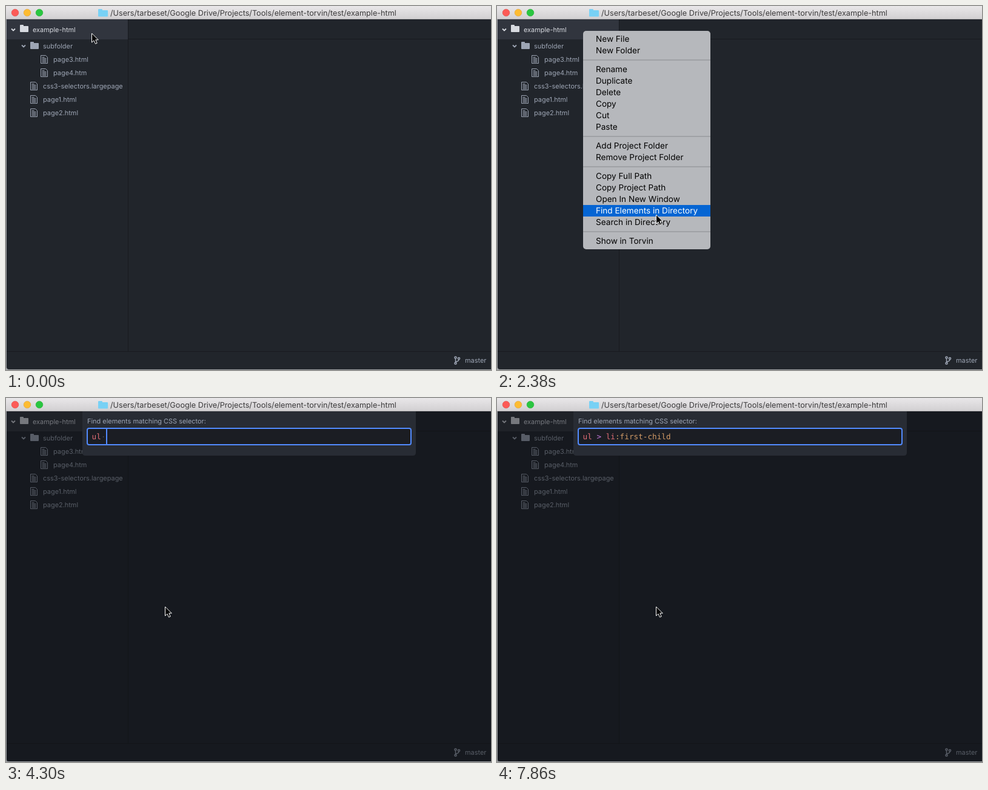
Animation of 800 by 600 pixels, one loop 8000 ms. Source, as an HTML page:

```html
<!DOCTYPE html>
<html lang="en">
<head>
<meta charset="utf-8">
<title>Find elements in directory</title>
<style>
  html, body { margin: 0; width: 100%; height: 100%; overflow: hidden; background: #a4a6a9; }
  svg { display: block; width: 800px; height: 600px; }
  text { font-family: Inter, sans-serif; text-rendering: geometricPrecision; white-space: pre; }
  .title { font-size: 12.68px; fill: #3c3b3c; }
  .ui { font-size: 10.93px; fill: #9da5b4; }
  .menu { font-size: 13.58px; fill: #000; }
  .menu.on { fill: #fff; }
  .code { font: 12.7px "DejaVu Sans Mono", monospace; }
  .bright { fill: #d7dae0; }
  .soft { fill: #9da5b4; }
  .line { fill: none; stroke: #9da5b4; }
</style>
</head>
<body>
<svg viewBox="0 0 800 600">
  <defs>
    <linearGradient id="bar" x2="0" y2="1">
      <stop stop-color="#e9e7e9"/><stop offset="1" stop-color="#d1cfd1"/>
    </linearGradient>
    <path id="folder" d="M0 1q0-1 1-1h4q1 0 1 1v1h7q1 0 1 1v8q0 1-1 1h-12q-1 0-1-1z"/>
    <path id="file" d="M.5.5h8l3 3v10h-11zM2.5 3.5h4M2.5 5.5h7M2.5 7.5h7M2.5 9.5h7M2.5 11.5h7"/>
  </defs>

  <path d="M1 20H800V599H5q-4 0-4-4z" fill="#21252b"/>
  <rect x="1" y="22" width="200" height="33" fill="#31353e"/>
  <path d="M201.5 22V569M202 54.5H800M1 569.5H800" stroke="#181a1f"/>
  <g id="tree"></g>
  <g class="line" stroke-width="1.5">
    <circle cx="741.5" cy="579.5" r="1.6"/>
    <circle cx="747" cy="581" r="1.6"/>
    <circle cx="741.5" cy="589" r="1.6"/>
    <path d="M741.5 581V587.5M747 582.5q0 3-5 4"/>
  </g>
  <text class="ui" x="757" y="588">master</text>

  <rect id="dim" x="1" y="22" width="799" height="577" fill="#0c0e11"/>
  <g id="dialog">
    <path d="M126 22H676V90q0 5-5 5H131q-5 0-5-5z" fill="#282c34"/>
    <text class="ui" x="134" y="42">Find elements matching CSS selector:</text>
    <rect x="134" y="50" width="534" height="27" rx="3" fill="#1b1d23" stroke="#528bff" stroke-width="2"/>
    <text id="query" class="code" x="141.5" y="68"></text>
    <circle id="space" cy="64" r=".9" fill="#484e59"/>
    <rect id="caret" y="51" width="2" height="25" fill="#528bff"/>
  </g>

  <rect width="800" height="22" fill="url(#bar)"/>
  <path d="M0 21.5H800" stroke="#b3b1b3"/>
  <g stroke-width=".6">
    <circle cx="15" cy="11" r="5.8" fill="#fc5b57" stroke="#df443f"/>
    <circle cx="35" cy="11" r="5.8" fill="#fdbc32" stroke="#dea034"/>
    <circle cx="55" cy="11" r="5.8" fill="#2ac641" stroke="#1dad2b"/>
  </g>
  <use href="#folder" transform="translate(152 5) scale(1.15 1.05)" fill="#78d1f5"/>
  <text class="title" x="172" y="16">/Users/tarbeset/Google Drive/Projects/Tools/element-torvin/test/example-html</text>

  <g id="menu"></g>
  <path id="mouse" d="M0 0V15L3.5 11.8L6 17.3L8.7 16.2L6.3 10.8H10.8Z" fill="#000" stroke="#fff"/>
</svg>
<script>
const $ = id => document.getElementById(id);

// Project tree: label, text x, row centre
const entries = [
  ['example-html', 44, 39], ['subfolder', 61, 66], ['page3.html', 78, 88], ['page4.htm', 78, 110],
  ['css3-selectors.largepage', 61, 132], ['page1.html', 61, 154], ['page2.html', 61, 176]
];
$('tree').innerHTML = entries.map(([label, x, y], i) => {
  const shade = i ? 'soft' : 'bright';
  const icon = i < 2
    ? `<path class="line" d="M${x - 35} ${y - 1.5}l3 3l3-3" stroke-width="1.8" style="stroke:${i ? '#9da5b4' : '#d7dae0'}"/>
       <use href="#folder" class="${shade}" x="${x - 21}" y="${i ? y - 7 : y - 8}"/>`
    : `<use href="#file" class="line" x="${x - 21}" y="${y - 7}"/>`;
  return `${icon}<text class="ui ${shade}" x="${x}" y="${y + 4}">${label}</text>`;
}).join('');

// Context menu, with empty strings as separators
const labels = ['New File', 'New Folder', '', 'Rename', 'Duplicate', 'Delete', 'Copy', 'Cut', 'Paste', '',
  'Add Project Folder', 'Remove Project Folder', '', 'Copy Full Path', 'Copy Project Path',
  'Open In New Window', 'Find Elements in Directory', 'Search in Directory', '', 'Show in Torvin'];
const items = [];
let rowTop = 45;
let menuBody = '<rect x="142" y="41" width="210" height="360" rx="5" fill="#b6b8bc"/>' +
  '<rect id="pick" x="142" width="210" height="19" fill="#0565d3"/>';
for (const label of labels) {
  if (label) {
    menuBody += `<text class="menu" x="163" y="${rowTop + 14}">${label}</text>`;
    items.push(rowTop);
    rowTop += 19;
  } else {
    menuBody += `<rect x="142" y="${rowTop + 5}" width="210" height="2" fill="#9fa1a5"/>`;
    rowTop += 12;
  }
}
$('menu').innerHTML = menuBody;
const menuTexts = [...document.querySelectorAll('.menu')];

// Typing: time, typed length, caret visible
const selector = 'ul > li:first-child';
const typing = [
  [0, 0, 1], [3560, 0, 0], [3850, 1, 1], [4000, 2, 1], [4300, 3, 1], [4600, 4, 1], [4750, 5, 1],
  [5040, 7, 1], [5490, 7, 0], [5640, 8, 1], [5780, 9, 1], [5930, 10, 1], [6080, 11, 1], [6220, 12, 1],
  [6370, 13, 1], [6670, 14, 1], [7120, 14, 0], [7270, 16, 1], [7410, 18, 1], [7560, 19, 1], [7860, 19, 0]
];
const colours = ['#e06c75', '#c678dd', '#e06c75', '#d19a66', '#abb2bf'];
const syntax = /^(u?l?)( ?>? ?)(l?i?)(:first-child|:first)?(.*)$/;
const advance = 7.646;

function drawMouse(t) {
  const step = t < 1340 ? 0 : Math.min(6, 1 + Math.floor((t - 1338) / 148));
  const p = step / 6, eased = p * p * (3 - 2 * p);
  const x = 141 + 121 * eased + .5;
  const y = t < 2380 ? 45 + 301 * eased : 344;
  $('mouse').setAttribute('transform', `translate(${x} ${y})`);
  return y;
}

function drawMenu(t, y) {
  $('menu').style.opacity = t < 1050 || t >= 2970 ? 0 : t < 2820 ? 1 : .6;
  const active = items.findIndex(top => y >= top && y < top + 19);
  $('pick').style.opacity = active < 0 ? 0 : 1;
  $('pick').setAttribute('y', items[active] || 0);
  menuTexts.forEach((text, i) => text.classList.toggle('on', i === active));
}

function drawDialog(t) {
  const shown = t < 3110 ? 0 : t < 3260 ? .6 : 1;
  $('dim').style.opacity = .48 * shown;
  $('dialog').style.opacity = shown;
  const [, length, caret] = typing.filter(key => key[0] <= t).pop();
  const typed = selector.slice(0, length);
  $('query').innerHTML = typed.match(syntax).slice(1)
    .map((part, i) => part ? `<tspan fill="${colours[i]}">${part.replace('>', '&gt;')}</tspan>` : '').join('');
  $('space').setAttribute('cx', 141.5 + (length - .5) * advance);
  $('space').style.opacity = typed.endsWith(' ') ? 1 : 0;
  $('caret').setAttribute('x', Math.round(142 + length * advance));
  $('caret').style.opacity = caret;
}

function frame() {
  const t = performance.now() % 8000;
  drawMenu(t, drawMouse(t));
  drawDialog(t);
  requestAnimationFrame(frame);
}
frame();
</script>
</body>
</html>
```
